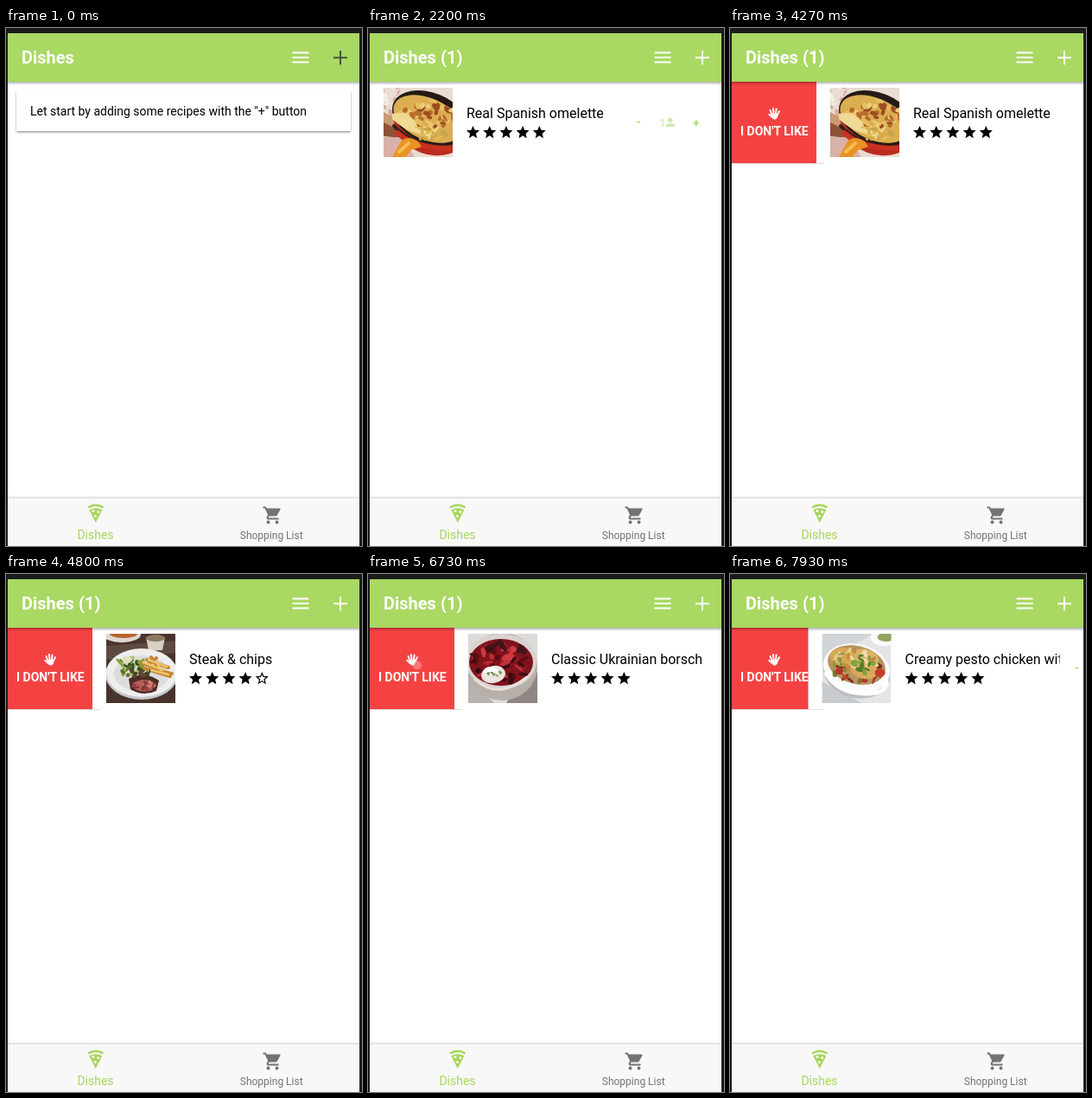
An HTML page for the animation above (8000 ms loop, 412 by 598 pixels).

```html
<!DOCTYPE html>
<html lang="en">
<head>
<meta charset="utf-8">
<title>Dishes</title>
<style>
  html, body { margin: 0; width: 100%; height: 100%; overflow: hidden; background: #1b1b1b; }
  svg { display: block; width: 412px; height: 598px; font-family: Roboto, sans-serif; }
</style>
</head>
<body>
<svg viewBox="0 0 412 598">
  <defs>
    <linearGradient id="shade" x2="0" y2="1">
      <stop offset="0" stop-color="#000" stop-opacity=".3"/>
      <stop offset="1" stop-color="#000" stop-opacity="0"/>
    </linearGradient>
    <filter id="lift" x="-5%" y="-20%" width="110%" height="150%">
      <feDropShadow dx="0" dy="1.5" stdDeviation="1.3" flood-opacity=".4"/>
    </filter>
    <clipPath id="screen"><rect x="2" y="6" width="407" height="592"/></clipPath>
    <clipPath id="label"><rect x="114" y="80" width="179" height="60"/></clipPath>
    <clipPath id="thumb"><rect width="80" height="80"/></clipPath>
    <path id="star" d="M12 17.27 18.18 21l-1.64-7.03L22 9.24l-7.19-.61L12 2 9.19 8.63 2 9.24l5.46 4.73L5.82 21z"/>
    <path id="hollow" fill-rule="evenodd" d="M22 9.24l-7.19-.62L12 2 9.19 8.63 2 9.24l5.46 4.73L5.82 21 12 17.27 18.18 21l-1.63-7.03zM12 15.4l-3.76 2.27 1-4.28-3.32-2.88 4.38-.38L12 6.1l1.71 4.04 4.38.38-3.32 2.88 1 4.28z"/>
  </defs>

  <g clip-path="url(#screen)">
    <rect x="2" y="6" width="407" height="592" fill="#fff"/>

    <g id="empty">
      <rect x="12" y="71" width="387" height="48" rx="2" fill="#fff" filter="url(#lift)"/>
      <text x="28" y="100.5" font-size="14">Let start by adding some recipes with the "+" button</text>
    </g>

    <g id="row">
      <g id="option">
        <path d="M2 156.5H109" stroke="#ddd"/>
        <rect x="2" y="62" width="98" height="94" fill="#f44242"/>
        <g stroke="#fff" stroke-linecap="round" stroke-width="2" fill="#fff">
          <path d="M48.2 99.5 46.6 95M50.5 98.5 49.9 93M53 98.5 53.6 93.6M55 100 56.9 96.2M48.5 102.8 45.3 99.8" fill="none"/>
          <path d="M48.4 99.5H55L54.6 103 53 105H50.4L48 102.6Z" stroke-width="1" stroke-linejoin="round"/>
        </g>
        <text x="12" y="124" font-size="14" font-weight="700" fill="#fff">I DON'T LIKE</text>
      </g>
      <circle id="touch" cx="57" cy="105.5" r="5" fill="#f5a0a0" opacity=".6"/>
      <g id="item">
        <rect x="2" y="62" width="407" height="94" fill="#fff"/>
        <g id="dishes"></g>
        <g fill="#a8d65c" font-weight="700" font-size="13">
          <text x="310.5" y="113">-</text>
          <text x="376.5" y="113.5" font-size="12">+</text>
          <g opacity=".5">
            <text x="337.5" y="113.5" font-size="12" font-weight="500">1</text>
            <circle cx="349.7" cy="106.3" r="2.7"/>
            <path d="M344.5 114V112.6Q345 110 349.7 110T355 112.6V114Z"/>
          </g>
        </g>
      </g>
    </g>

    <rect x="2" y="62" width="407" height="4" fill="url(#shade)"/>
    <rect x="2" y="6" width="407" height="56" fill="#a9d863"/>
    <text id="title" x="18" y="41" font-size="20" font-weight="700" fill="#fff"></text>
    <path d="M331.5 28.5h19M331.5 34h19M331.5 39.5h19" stroke="#fff" stroke-width="2"/>
    <path id="plus" d="M379 34.2h16M387 26.2v16" stroke-width="2"/>

    <rect x="2" y="542" width="407" height="56" fill="#f8f8f8"/>
    <path d="M2 542H409" stroke="#dcdcdc" stroke-width="1.5"/>
    <g fill="#a8d65c">
      <path d="M95 553.5Q103.8 548 112.6 553.5" fill="none" stroke="#a8d65c" stroke-width="2.6"/>
      <path d="M96.2 556.2Q103.8 552.2 111.4 556.2L103.8 571Z"/>
      <g fill="#f8f8f8">
        <circle cx="101" cy="557.5" r="1.5"/><circle cx="106.8" cy="558.6" r="1.5"/><circle cx="103.4" cy="563.5" r="1.5"/>
      </g>
      <text x="103.5" y="590" font-size="14" text-anchor="middle">Dishes</text>
    </g>
    <g fill="#737373">
      <path transform="translate(296.5 550.5)" d="M7 18a2 2 0 1 0 0 4 2 2 0 0 0 0-4zM1 2v2h2l3.6 7.59-1.35 2.45C4.5 15.4 5.5 17 7 17h12v-2H7.42c-.14 0-.25-.11-.25-.25l.03-.12.9-1.63h7.45c.75 0 1.41-.41 1.75-1.03l3.58-6.49A1 1 0 0 0 20 4H5.21l-.94-2zM17 18a2 2 0 1 0 0 4 2 2 0 0 0 0-4z"/>
      <text x="307.2" y="590" font-size="12" text-anchor="middle">Shopping List</text>
    </g>
  </g>
</svg>
<script>
const $ = id => document.getElementById(id);
const LOOP = 8000;

const oval = (x, y, rx, ry, fill, turn = 0) =>
  `<ellipse cx="${x}" cy="${y}" rx="${rx}" ry="${ry}" fill="${fill}" transform="rotate(${turn} ${x} ${y})"/>`;
const shape = (d, fill) => `<path d="${d}" fill="${fill}"/>`;
const line = (d, color, width) =>
  `<path d="${d}" fill="none" stroke="${color}" stroke-width="${width}" stroke-linecap="round"/>`;

// Small random flecks spread over an elliptical area.
function flecks(seed, count, x, y, rx, ry, size, colors) {
  const random = () => (seed = (seed * 16807) % 2147483647) / 2147483647;
  let out = '';
  for (let i = 0; i < count; i++) {
    const angle = random() * 6.283, reach = Math.sqrt(random());
    out += oval(x + rx * reach * Math.cos(angle), y + ry * reach * Math.sin(angle),
      size * (.6 + random()), size * (.3 + random() * .5),
      colors[i % colors.length], random() * 180);
  }
  return out;
}

const omelette = () =>
  shape('M0 0H80V80H0Z', '#e9dcd2') +
  flecks(11, 25, 12, 15, 18, 18, 3, ['#f5efe8', '#d8aaa0']) +
  shape('M0 32 16 42 22 58 0 56Z', '#8e5238') + shape('M0 28 14 36 12 46 0 40Z', '#c89a74') +
  shape('M0 57H22L36 80H0Z', '#d9b1a8') +
  oval(55, 43, 44, 34, '#b92a20', 20) + oval(54, 35, 46, 29, '#251a16', 22) +
  oval(51, 36, 42, 24, '#dcae52', 24) +
  flecks(5, 48, 52, 30, 34, 17, 4, ['#edcd76', '#b86c2d', '#e5bd60', '#9c4d22']) +
  shape('M10 30Q26 26 36 38L44 54Q24 50 10 36Z', '#efd994') +
  flecks(8, 24, 52, 52, 20, 8, 3.5, ['#f0dc92', '#dfbd58', '#c9a548']) +
  line('M12 44Q28 62 62 68', '#332019', 4) + line('M16 52Q36 70 76 70', '#c93120', 6) +
  shape('M10 80 20 62Q28 54 40 62L44 68 32 72 26 80Z', '#e99325') + line('M18 74 29 64', '#f6bd52', 4);

const steak = () =>
  shape('M0 0H80V80H0Z', '#49342d') + shape('M0 14 80 8V22L0 30Z', '#5f4a41') +
  oval(18, 1, 22, 9, '#ddd8d2') + oval(20, 0, 16, 5, '#b8642c') +
  shape('M46 4H68L65 19H49Z', '#d9d0c3') + oval(57, 5, 11, 4, '#8c7961') +
  oval(41, 47, 42, 29, '#c6c6c8') + oval(41, 45, 41, 28, '#eeeeee') + oval(41, 46, 32, 21, '#dcdcdc') +
  flecks(21, 34, 28, 38, 15, 11, 3.5, ['#557329', '#88a13b', '#3a5222', '#b5bf70']) +
  oval(24, 30, 6, 4, '#dfe0bd') +
  line('M42 34 68 44M47 30 72 39M44 40 74 49M52 27 62 43M56 42 76 46M48 36 58 28', '#c58632', 4) +
  line('M43 33 66 42M49 30 70 38M58 32 63 42M52 42 72 47', '#efc36c', 2.5) +
  shape('M26 52Q44 42 61 54L58 66Q42 73 28 64Z', '#4d2c25') +
  shape('M31 57Q44 49 56 57L53 65Q42 69 32 63Z', '#b65b58') +
  flecks(13, 18, 44, 60, 12, 5, 2.5, ['#d18478', '#7d3530', '#943f40']) +
  flecks(4, 14, 36, 46, 14, 4, 3, ['#33421f', '#5c492f']);

const borsch = () =>
  shape('M0 0H80V80H0Z', '#dddbd9') + shape('M58 56 80 44V80H44Z', '#8e8784') + shape('M0 50 30 80H0Z', '#b9b3b0') +
  oval(39, 38, 41, 39, '#b6afaa') + oval(38, 32, 41, 32, '#d9d3cf') +
  oval(38, 33, 37, 27, '#80131c') +
  flecks(31, 52, 38, 33, 33, 23, 4.5, ['#a51c28', '#5b0d14', '#bd303a', '#370d12']) +
  flecks(9, 12, 40, 20, 28, 8, 5, ['#d13a42', '#42151b']) +
  oval(29, 47, 14, 10, '#ece4df', -10) + oval(26, 43, 8, 5, '#fff') +
  flecks(6, 10, 30, 45, 8, 5, 1.6, ['#4f7736', '#7a9850']) +
  line('M8 53Q34 77 68 50', '#e6e1de', 3);

const chicken = () =>
  shape('M0 0H80V80H0Z', '#e4e5e6') + shape('M0 0H60L0 34Z', '#d1d5d7') + shape('M0 55 46 80H0Z', '#c8cbcd') +
  oval(72, 4, 16, 10, '#fafafa') + oval(74, 4, 10, 5, '#92a45d') +
  oval(40, 45, 39, 29, '#bcbfc0', 14) + oval(40, 40, 39, 28, '#fbfbfb', 14) + oval(40, 36, 34, 22, '#b8935f', 14) +
  flecks(17, 30, 42, 44, 28, 12, 4, ['#a33824', '#c54b2d', '#6f7c36', '#762e20']) +
  oval(25, 27, 16, 11, '#d5a955', 10) + oval(51, 27, 15, 9, '#d7b263', 18) + oval(49, 42, 16, 10, '#d7aa59', 12) +
  flecks(23, 45, 39, 33, 26, 14, 3, ['#e8ce8c', '#c48b38', '#f0dca8', '#7e9944']) +
  flecks(3, 12, 46, 35, 14, 10, 3.5, ['#527c2b', '#81a341']) +
  oval(67, 45, 6, 5, '#c13e2b') + oval(20, 43, 5, 4, '#ba3525') +
  line('M5 46Q18 68 48 69T74 52', '#fff', 5);

const dishes = [
  { from: 450, name: 'Real Spanish omelette', stars: 5, photo: omelette },
  { from: 4570, name: 'Steak &amp; chips', stars: 4, photo: steak },
  { from: 5550, name: 'Classic Ukrainian borsch', stars: 5, photo: borsch },
  { from: 6850, name: 'Creamy pesto chicken with tomatoes', stars: 5, photo: chicken }
];
dishes[2].from = 5700;

$('dishes').innerHTML = dishes.map(dish => {
  const stars = [0, 1, 2, 3, 4].map(i =>
    `<use href="#${i < dish.stars ? 'star' : 'hollow'}" transform="translate(${112.5 + 19.2 * i} 111.4) scale(.75)"/>`);
  return `<g>
    <g transform="translate(18 69)"><g clip-path="url(#thumb)">${dish.photo()}</g></g>
    <g clip-path="url(#label)"><text x="114" y="104" font-size="16">${dish.name}</text></g>
    ${stars.join('')}</g>`;
}).join('');
const cards = [...$('dishes').children];

// Row offset: [time, x]
const swipe = [[0, 0], [2700, 0], [3250, 107], [3500, 107], [3700, 98], [7840, 98], [7930, 89], [8000, 72]];
const taps = [[4400, 4600], [5540, 5740], [6670, 6870]];

function offsetAt(t) {
  const i = swipe.findIndex(([time]) => time > t);
  const [t0, x0] = swipe[i - 1], [t1, x1] = swipe[i];
  const p = (t - t0) / (t1 - t0);
  return x0 + (x1 - x0) * p * (2 - p);
}

const show = (node, on) => { node.style.display = on ? '' : 'none'; };

function draw(now) {
  const t = now % LOOP;
  const current = dishes.filter(dish => t >= dish.from).length - 1;
  const filled = current >= 0;
  const x = offsetAt(t);
  show($('empty'), !filled);
  show($('row'), filled);
  show($('option'), x > 0);
  show($('touch'), taps.some(([from, to]) => t >= from && t < to));
  cards.forEach((card, i) => show(card, i === current));
  $('item').setAttribute('transform', `translate(${x.toFixed(2)} 0)`);
  $('title').textContent = filled ? 'Dishes (1)' : 'Dishes';
  $('plus').setAttribute('stroke', t < 250 ? '#465337' : '#fff');
}

const start = performance.now();
function tick() {
  draw(performance.now() - start);
  requestAnimationFrame(tick);
}
tick();
</script>
</body>
</html>
```
